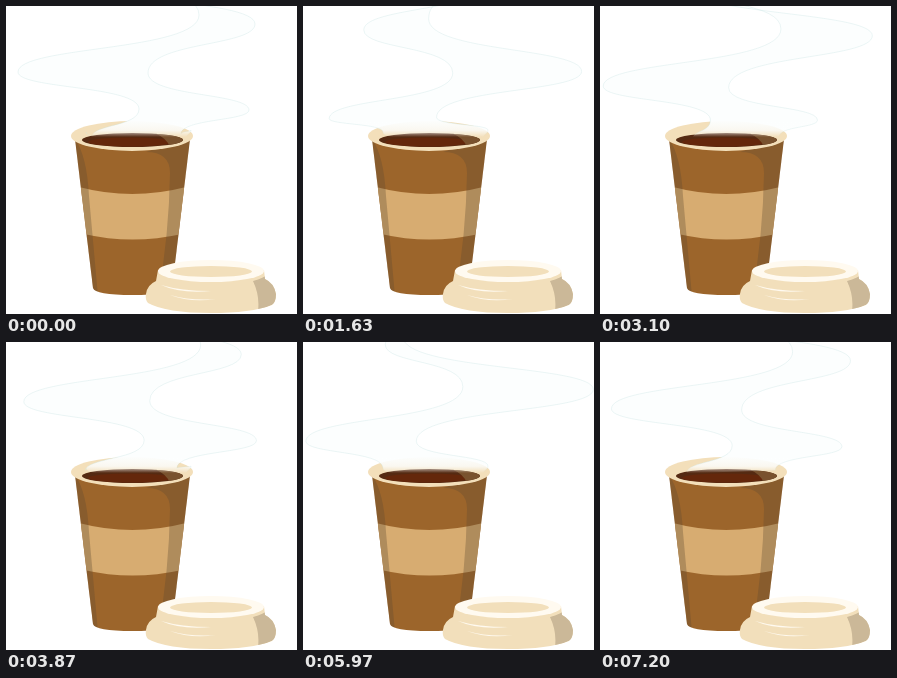
These frames come from a looping animation (291x308 px, 7230 ms). An HTML page with a canvas:

```html
<!DOCTYPE html>
<html lang="en">
<head>
<meta charset="utf-8">
<title>Coffee cup</title>
<style>
html, body { margin: 0; width: 100%; height: 100%; overflow: hidden; background: #fff; }
canvas { display: block; width: 291px; height: 308px; }
</style>
</head>
<body>
<canvas id="stage"></canvas>
<script>
const W = 291, H = 308, LOOP = 7230, RISE = LOOP / 2, FPS = 30;
const canvas = document.getElementById('stage');
const ctx = canvas.getContext('2d');
const dpr = window.devicePixelRatio || 1;
canvas.width = W * dpr;
canvas.height = H * dpr;
ctx.scale(dpr, dpr);

// The steam is a ribbon whose bends climb one wave per RISE.
// Each path is where a bend goes, one point per third of a rise.
const STEPS = 3;
const LEFT_TIP = [[95, 134], [86, 131], [43, 119], [2, 98], [12, 66], [48, 36], [84, 1]];
const LEFT_DIP = [[80, 126], [133, 103], [145, 79], [161, 43], [193, 9], [190, -18]];
const RIGHT_DIP = [[180, 133], [175, 128], [148, 117], [113, 98], [142, 67], [137, 25], [98, -7]];
const RIGHT_TIP = [[185, 124], [243, 104], [268, 76], [290, 46], [249, 18], [172, -8]];

// Smooth travel along a path; it waits at the first point and drifts on past the last.
function bend(path, rise) {
  const last = path.length - 1;
  const s = Math.max(0, rise * STEPS + 1);
  const i = Math.min(Math.floor(s), last - 1);
  const u = s - i;
  return [0, 1].map(k => {
    const b = path[i][k], c = path[i + 1][k];
    if (u > 1) return b + (c - b) * u;
    const a = i > 0 ? path[i - 1][k] : b;
    const d = i + 2 <= last ? path[i + 2][k] : 2 * c - b;
    return b + u / 2 * (c - a + u * (2 * a - 5 * b + 4 * c - d + u * (3 * (b - c) + d - a)));
  });
}

// Bends of one edge, from the cup upwards.
function edge(lower, upper, rise) {
  const pts = [];
  for (let k = -1; k <= 2; k++) pts.push(bend(lower, rise + k), bend(upper, rise + k));
  return pts;
}

// Even points are the pointed tips, odd ones the rounder dips.
function follow(pts) {
  const pull = i => i % 2 ? 0.64 : 0.46;
  for (let i = 1; i < pts.length; i++) {
    const [x0, y0] = pts[i - 1], [x1, y1] = pts[i];
    const h = y1 - y0;
    ctx.bezierCurveTo(x0, y0 + h * pull(i - 1), x1, y1 - h * pull(i), x1, y1);
  }
}

function fade(color, alpha) {
  const g = ctx.createLinearGradient(0, 114, 0, 131);
  g.addColorStop(0, `rgba(${color},${alpha})`);
  g.addColorStop(0.6, `rgba(${color},${alpha * 0.8})`);
  g.addColorStop(1, `rgba(${color},0)`);
  return g;
}

function steam(rise) {
  const left = edge(LEFT_TIP, LEFT_DIP, rise);
  const right = edge(RIGHT_DIP, RIGHT_TIP, rise).reverse();
  ctx.beginPath();
  ctx.moveTo(...left[0]);
  follow(left);
  ctx.lineTo(...right[0]);
  follow(right);
  ctx.closePath();
  ctx.fillStyle = fade('252,254,254', 1);
  ctx.fill();
  ctx.strokeStyle = fade('190,222,222', 0.5);
  ctx.lineWidth = 0.6;
  ctx.stroke();
}

function oval(x, y, rx, ry, color) {
  ctx.beginPath();
  ctx.ellipse(x, y, rx, ry, 0, 0, Math.PI * 2);
  ctx.fillStyle = color;
  ctx.fill();
}

function shape(d, color) {
  ctx.fillStyle = color;
  ctx.fill(new Path2D(d));
}

function clipped(d, draw) {
  ctx.save();
  ctx.clip(new Path2D(d));
  draw();
  ctx.restore();
}

const BODY = 'M69 133 H184 L166 282 Q164 289 126.5 289 Q89 289 87 282 Z';
const COFFEE = 'M76 134 A50.5 7 0 0 1 177 134 A50.5 7 0 0 1 76 134 Z';
const LID = 'M152 264 L150 275 Q141 279 140 288 Q139 294 142 297 Q160 307 205 307'
  + ' Q245 307 266 299 Q270 296 270 288 Q268 277 259 273 L258 264 Z';
const SHADE = 'rgba(95,75,50,0.33)';

function cup() {
  clipped(BODY, () => {
    shape('M60 130 H190 V290 H60 Z', '#9c652b');
    shape('M73 181 Q126 195 180 181 L176 228 Q126 239 78 228 Z', '#d7ac71');
    shape('M69 133 Q81 150 83 190 L92 290 H60 V133 Z', SHADE);
    shape('M140 146 Q164 146 164 167 Q163 230 152 290 H190 V130 Z', SHADE);
  });
  oval(126, 130, 61, 15, '#f3dfba');
  shape(COFFEE, '#552a12');
  clipped(COFFEE, () => {
    oval(124, 136, 42, 4.5, '#64270b');
    shape('M146 126 H180 V142 H164 Q162 132 146 126 Z', '#79522e');
  });
}

function lid() {
  shape(LID, '#f2dfbb');
  clipped(LID, () => {
    shape('M247 275 Q258 272 262 268 L272 276 V296 L252 305 Q254 290 247 275 Z', '#cbb898');
    shape('M155 279 Q175 285 205 285 Q175 288 155 279 Z', '#fffaf0');
    shape('M164 289 Q185 295 210 293 Q185 297 164 289 Z', '#fffaf0');
  });
  oval(205, 265, 53, 11, '#fffaf0');
  oval(205, 265.5, 41, 5.5, '#f2dfbb');
}

let start = null;
function draw(now) {
  if (start === null) start = now;
  const tick = Math.floor((now - start) % LOOP * FPS / 1000 + 0.1);
  ctx.fillStyle = '#fff';
  ctx.fillRect(0, 0, W, H);
  cup();
  lid();
  steam(tick * 1000 / FPS / RISE % 1);
  requestAnimationFrame(draw);
}
draw(performance.now());
</script>
</body>
</html>
```
